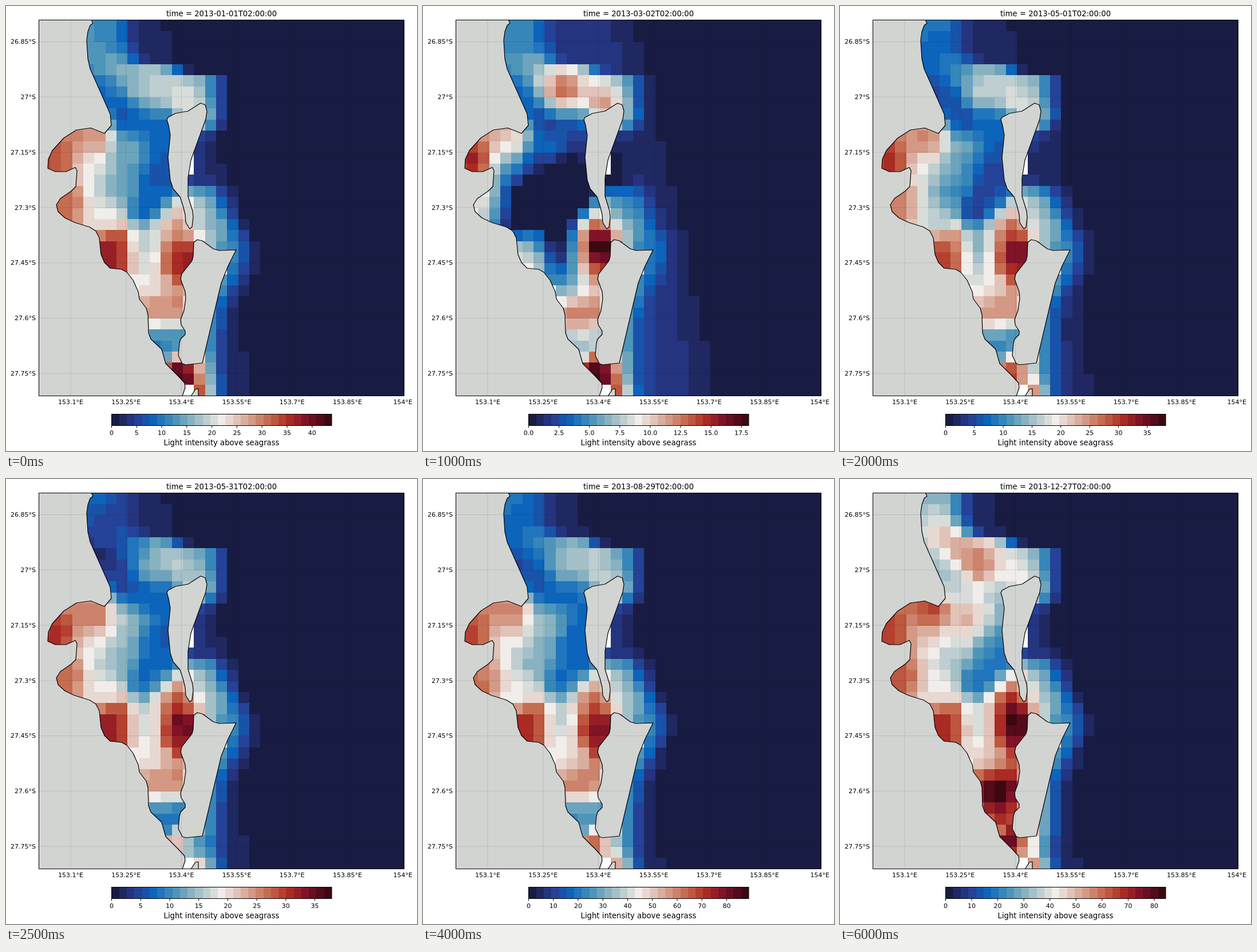
An HTML page with a canvas for the animation above (6.5 s loop, 718 px wide and 779 px high).

```html
<!DOCTYPE html>
<html lang="en">
<head>
<meta charset="utf-8">
<title>Light intensity above seagrass</title>
<style>
  html, body { margin: 0; width: 718px; height: 779px; overflow: hidden; background: #fff; }
  canvas { display: block; }
</style>
</head>
<body>
<canvas id="stage" width="718" height="779"></canvas>
<script>
const ctx = document.getElementById('stage').getContext('2d');
const STEP_MS = 500, STEPS = 13;
const COLS = 33, ROWS = 34, SHADES = 29;
const LAND = 'rgb(210,212,210)';
const map = { x: 57.5, y: 24.5, w: 638, h: 658 };
const bar = { x: 184.5, y: 714.5, w: 384.5, h: 20 };

const lerp = (a, b, t) => a + (b - a) * t;
const clamp = (v, lo, hi) => Math.min(hi, Math.max(lo, v));
const bell = (x, width) => Math.exp(-((x / width) ** 2));
const spread = (c, r, x, y, radius) => bell(Math.hypot(c - x, r - y), radius);

// Piecewise linear path through [position, value] points
function along(points, p) {
  const i = Math.max(1, points.findIndex(([at]) => at >= p));
  const [a, from] = points[i - 1], [b, to] = points[i];
  return lerp(from, to, (p - a) / (b - a));
}

// Dark blue to white to dark red
const stops = ['181c43', '293a8f', '0b66bd', '4590b9', '8eb5c2', 'd2d8d5',
  'e6d2cc', 'd59d89', 'c46548', 'ac2b24', '780e28', '3c0911'];
const channels = [0, 2, 4].map(k => stops.map((hex, i) => [i / 11, parseInt(hex.slice(k, k + 2), 16)]));
channels.forEach((points, k) => points.splice(6, 0, [.5, 240 - 3 * k]));
const shades = Array.from({ length: SHADES }, (_, i) =>
  `rgb(${channels.map(points => Math.round(along(points, i / (SHADES - 1)))).join(',')})`);
const shade = level => shades[Math.floor(clamp(level, 0, .999) * SHADES)];

const maximum = [[0, 43.9], [2, 18.1], [3, 38.5], [5, 37.9], [7, 70.8], [9, 107], [10, 112.6], [12, 84.4]];

// January soundings: column, row, percent of the maximum
const soundings = [
  [5, 1, 28], [7, 4, 36], [5.5, 6.3, 19], [9.5, 6, 42], [13, 7, 50], [14.5, 5, 36],
  [7.5, 8.3, 15], [10.5, 9, 19], [4.3, 10, 66], [7.5, 11.5, 33], [10.3, 13, 17], [1.2, 12.6, 76],
  [4, 13, 50], [6.5, 14.5, 35], [1.8, 16.3, 72], [5, 17, 51], [9.7, 16, 19], [14.5, 12, 8],
  [14.8, 17.5, 38], [12, 18, 64], [6.2, 20.6, 86], [9.2, 20.3, 42], [12, 21.2, 84], [9.5, 23.3, 50],
  [17.5, 20.5, 28], [10.5, 25.8, 68], [10.8, 28.5, 22], [13, 31.7, 98], [15.2, 31, 34], [15.8, 25, 34]
];

const seasons = {
  flood: step => bell(step - 2.4, 1.2),
  winter: step => bell(step - 6, 2.2),
  spring: step => bell(step - 10, 1.4),
  summer: step => bell(step - 12, 1.5)
};

// Places that brighten or dim with the seasons
const places = [
  { x: 6, y: 3.5, radius: 4, winter: -25, summer: 24 },              // north coast
  { x: 9, y: 5.8, radius: 2, flood: 38, summer: 12 },                // north bank
  { x: 13, y: 7, radius: 1.8, flood: 18, winter: -8, spring: -15 },  // island tip
  { x: 8.5, y: 10, radius: 3.5, spring: 14, summer: 28 },            // middle of the bay
  { x: 6, y: 11, radius: 2.5, winter: 13, spring: 8 },               // bay entrance
  { x: 1.2, y: 12.6, radius: 1.6, flood: 20, winter: 8 },            // west inlet
  { x: 2, y: 14.5, radius: 3.5, spring: -24, summer: 8 },            // west shore
  { x: 7, y: 18, radius: 6, flood: -64 },                            // river plume
  { x: 6.2, y: 20, radius: 2.5, spring: -36 },                       // river mouth
  { x: 12.2, y: 19.3, radius: 2.2, flood: 58, winter: 18, spring: 20, summer: 22 }, // passage
  { x: 11, y: 28.3, radius: 3, flood: 22, spring: 40, summer: 55 },  // south channel
  { x: 13, y: 31.7, radius: 1.8, winter: -66, spring: -50, summer: -30 }            // south end
];

const emptyCells = [[13, 12], [13, 13], [16, 22], [8, 24], [13, 33]];

const mainland = [
  149, 24, 152, 30, 147, 34, 143, 45, 141, 60, 143, 92, 147, 110, 182, 189, 184, 209, 172, 223,
  148, 213.5, 123, 217, 101, 231, 81, 253, 74, 268, 73, 284, 86, 290, 105, 290, 121, 282.5,
  124, 288, 122, 316, 114, 324, 95, 337, 88, 348, 91, 360, 103, 371, 120, 379, 146, 387, 157, 394,
  163, 406, 166, 435, 172, 449, 182, 459, 202, 461, 211, 466, 222, 480, 231, 500, 233, 513,
  245, 529, 248, 540, 249, 572, 253, 583, 272, 601, 279, 626, 301, 648, 312, 660, 313, 668,
  308, 683, 50, 683, 50, 24
];
const northIsland = [
  281, 199, 283, 195, 296, 188, 318, 184, 340, 170, 348, 173, 351, 184, 349, 198, 323, 270,
  318, 301, 318, 333, 326, 359, 327, 370, 325, 387, 321, 390, 314, 379, 313, 365, 309, 349,
  304, 334, 292, 320, 287, 305, 283, 265, 287, 226, 284, 209
];
const southIsland = [
  328, 414, 334, 409, 343, 411, 362, 425, 372, 428, 402, 427, 388, 455, 376, 485, 343, 625,
  314, 628, 308, 626, 301, 612, 303, 590, 305, 583, 313, 575, 313, 569, 306, 558, 305, 549,
  311, 533, 314, 512, 313, 500, 305, 478, 307, 469, 325, 446, 327, 438
];
const islet = [323, 683, 331, 671, 336, 670, 336, 683];

function light(c, r, season) {
  let sum = 0, weight = 1e-12;
  for (const [x, y, level] of soundings) {
    const w = spread(c, r, x, y, 1.6);
    sum += w * level;
    weight += w;
  }
  let shallow = sum / weight;
  for (const place of places) {
    const change = Object.keys(seasons).reduce((s, name) => s + (place[name] || 0) * season[name], 0);
    shallow += change * spread(c, r, place.x, place.y, place.radius);
  }
  // Beyond the shore edge the sea floor drops and the light fades out
  const edge = 15.5 + 2.7 * bell(r - 20.5, 3.5) - 8.3 * clamp((5 - r) / 2.2, 0, 1);
  const cover = 1 / (1 + Math.exp((c - edge) / .6));
  const reach = 15 + .22 * r + 3 * season.flood - 3 * season.spring;
  const shelf = (4 + 5 * season.flood) * clamp((reach - c) / 5, 0, 1);
  return lerp(shelf, clamp(shallow, 2, 100), cover) / 100;
}

function cell(c, r, fill) {
  const edge = (start, size, n, k) => Math.round(start + size * k / n);
  const x = edge(map.x, map.w, COLS, c), y = edge(map.y, map.h, ROWS, r);
  ctx.fillStyle = fill;
  ctx.fillRect(x, y, edge(map.x, map.w, COLS, c + 1) - x, edge(map.y, map.h, ROWS, r + 1) - y);
}

function land(points) {
  ctx.beginPath();
  for (let i = 0; i < points.length; i += 2) ctx.lineTo(points[i], points[i + 1]);
  ctx.closePath();
  ctx.fillStyle = LAND;
  ctx.fill();
  ctx.strokeStyle = '#000';
  ctx.lineWidth = 1.2;
  ctx.lineJoin = 'round';
  ctx.stroke();
}

function line(x1, y1, x2, y2) {
  ctx.beginPath();
  ctx.moveTo(x1, y1);
  ctx.lineTo(x2, y2);
  ctx.stroke();
}

function text(label, x, baseline, size = 11, align = 'center') {
  ctx.font = `${size}px "DejaVu Sans", sans-serif`;
  ctx.textAlign = align;
  ctx.fillStyle = '#000';
  ctx.fillText(label, x, baseline);
}

function outline({ x, y, w, h }) {
  ctx.strokeStyle = '#000';
  ctx.lineWidth = 1;
  ctx.strokeRect(x, y, w, h);
}

function drawMap(step) {
  const season = Object.fromEntries(Object.entries(seasons).map(([name, curve]) => [name, curve(step)]));
  for (let r = 0; r < ROWS; r++)
    for (let c = 0; c < COLS; c++) cell(c, r, shade(light(c, r, season)));
  emptyCells.forEach(([c, r]) => cell(c, r, '#fff'));

  ctx.save();
  ctx.beginPath();
  ctx.rect(map.x, map.y, map.w, map.h);
  ctx.clip();
  [mainland, northIsland, southIsland, islet].forEach(land);
  ctx.restore();

  for (let i = 0; i < 7; i++) {
    const x = 113 + 96.7 * i, y = 62.5 + 96.75 * i;
    ctx.strokeStyle = 'rgba(0,0,0,.12)';
    ctx.lineWidth = .9;
    line(x, map.y, x, map.y + map.h);
    line(map.x, y, map.x + map.w, y);
    text(`${+(153.1 + .15 * i).toFixed(2)}°E`, x, 697);
    text(`${+(26.85 + .15 * i).toFixed(2)}°S`, 52, Math.round(y + 3.9), 11, 'right');
  }
  outline(map);
}

function drawBar(max) {
  shades.forEach((fill, i) => {
    const x = Math.round(bar.x + bar.w * i / SHADES);
    ctx.fillStyle = fill;
    ctx.fillRect(x, bar.y, Math.round(bar.x + bar.w * (i + 1) / SHADES) - x, bar.h);
  });
  outline(bar);
  const gap = max < 20 ? 2.5 : max < 50 ? 5 : max < 90 ? 10 : 20;
  for (let v = 0; v <= max; v += gap) {
    const x = bar.x + bar.w * v / max;
    line(x, bar.y + bar.h, x, bar.y + bar.h + 4);
    text(v.toFixed(gap === 2.5 ? 1 : 0), x, 751);
  }
  text('Light intensity above seagrass', 376.5, 769, 13.2);
}

function draw(step) {
  ctx.fillStyle = '#fff';
  ctx.fillRect(0, 0, 718, 779);
  drawMap(step);
  drawBar(along(maximum, step));
  const day = new Date(Date.UTC(2013, 0, 1 + 30 * step, 2)).toISOString().slice(0, 19);
  text(`time = ${day}`, 376.5, 18, 13.2);
}

let shown = -1;
const start = performance.now();
function tick() {
  const step = Math.floor((performance.now() - start) / STEP_MS) % STEPS;
  if (step !== shown) draw(shown = step);
  requestAnimationFrame(tick);
}
tick();
</script>
</body>
</html>
```
